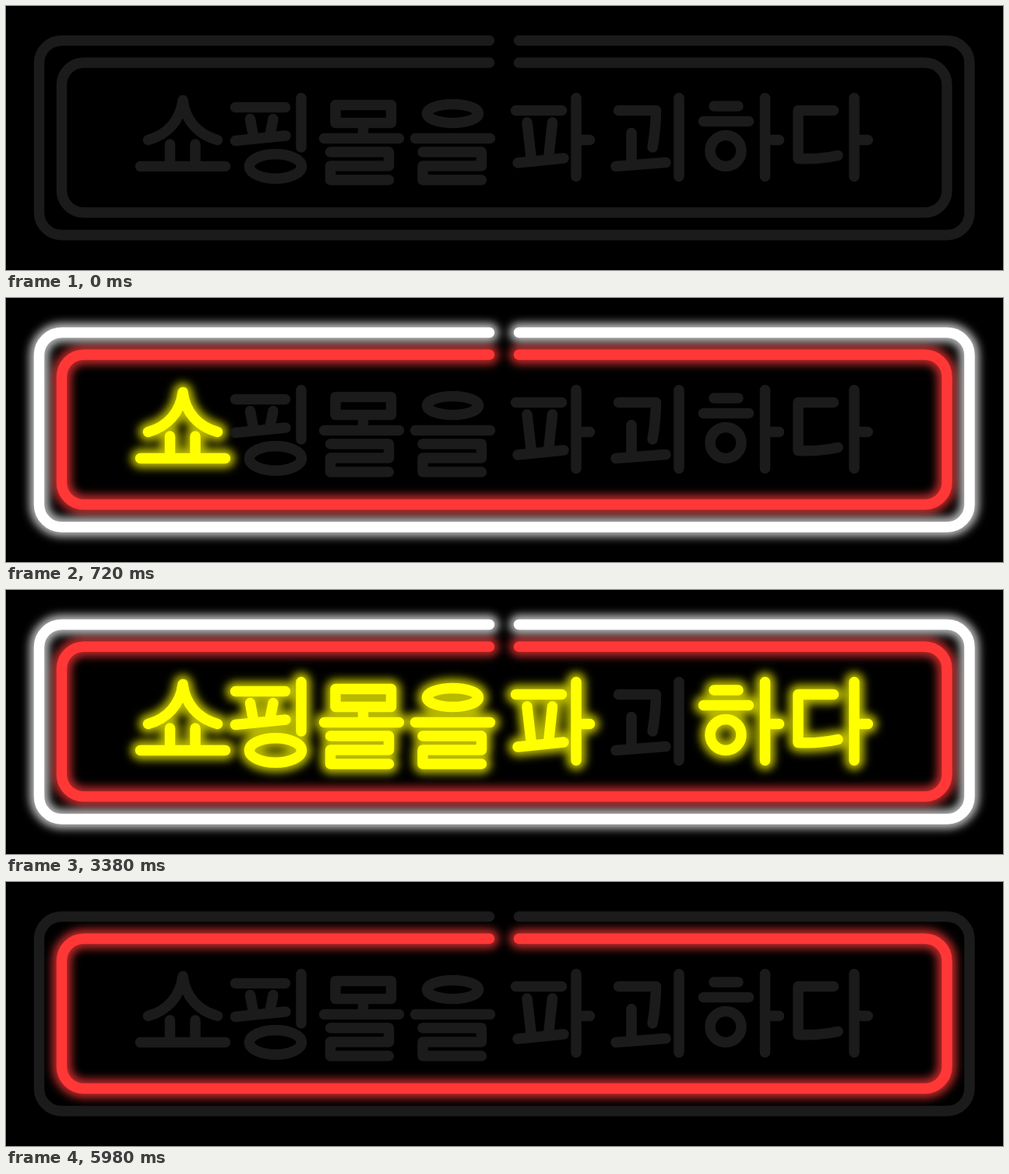
An HTML page that plays this animation: 1280 px wide and 340 px high, repeating every 6.08 s.

```html
<!DOCTYPE html>
<html lang="ko">
<head>
<meta charset="utf-8">
<title>쇼핑몰을 파괴하다</title>
<style>
  html, body { margin: 0; width: 100%; height: 100%; overflow: hidden; background: #000; }
  svg { display: block; width: 100%; height: 100%; }
  path { fill: none; stroke-width: 13.5; stroke-linecap: round; stroke-linejoin: round; }
  .glow { stroke-width: 25; opacity: .72; filter: url(#soft); mix-blend-mode: screen; }
</style>
</head>
<body>
<svg viewBox="0 0 1280 340" role="img" aria-label="쇼핑몰을 파괴하다">
  <defs>
    <filter id="soft" filterUnits="userSpaceOnUse" x="0" y="0" width="1280" height="340" color-interpolation-filters="sRGB">
      <feGaussianBlur stdDeviation="5.5"/>
    </filter>
  </defs>
  <rect width="1280" height="340"/>
  <g id="glows"></g>
  <g id="tubes"></g>
</svg>
<script>
const LOOP = 6080;
const OFF = '#1b1b1b', COOLING = '#272727';
const WHITE = '#fff', RED = '#ff3737', YELLOW = '#ff0';

// Rounded frame, open at the top centre.
function frame(l, t, r, b, c) {
  const arc = (x, y) => `A${c} ${c} 0 0 0 ${x} ${y}`;
  return `M620.5 ${t}H${l + c}${arc(l, t + c)}V${b - c}${arc(l + c, b)}` +
    `H${r - c}${arc(r, b - c)}V${t + c}${arc(r - c, t)}H658.5`;
}
const oval = (x, y, rx, ry) =>
  `M${x - rx} ${y}a${rx} ${ry} 0 1 1 ${2 * rx} 0a${rx} ${ry} 0 1 1 ${-2 * rx} 0Z`;
const rieul = (x, w) => `M${x} 188h${w}v18h${-w}v18h${w}`;
const stem = x => `M${x} 118.5V219.5`;
const tick = (x, w) => stem(x) + `M${x} 172.5h${w}`;

// Each part: path, lit colour, [on, off] spans in ms.
const parts = [
  [frame(42.5, 44.5, 1237, 295, 29), WHITE, [[620, 5980]]],
  [frame(71.5, 73, 1208, 266, 28.5), RED, [[100, 600], [620, 1260], [1280, LOOP]]],
  ['M182.5 172.5C207 166 224 147 227 121.5C230 147 247 166 271.5 172.5M210.5 178V206M243 178V206M172.5 206.5H281.5',
    YELLOW, [[660, 5880]]],
  ['M294.5 130.5H358.5M313.5 145.5L318 170M343 145.5L338.5 168M294.5 173.5L359 167M379 118.5V182' + oval(346, 206.5, 33.5, 15.8),
    YELLOW, [[760, 5780]]],
  ['M423 127.5H494.5V150.5H423ZM458.5 151V170M408.5 170.5H504.5' + rieul(416.5, 75),
    YELLOW, [[860, 5680]]],
  [oval(573.5, 138.5, 33, 12) + 'M525.5 170.5H621.5' + rieul(535, 75.5),
    YELLOW, [[960, 5680]]],
  ['M654.5 134.5H713.5M669 150L674.5 198M701.5 150L696.5 196M657 202L716 196' + tick(732, 17.5),
    YELLOW, [[1060, 5580]]],
  ['M786.5 134.5H834.5Q834 160 830 182M803 163.5V204M783 206.5L847 201.5' + stem(864),
    YELLOW, [[1260, 3380], [5380, 5580]]],
  ['M909 129H940M895.5 148.5H953.5' + oval(924, 186.5, 20, 20) + tick(974.5, 18),
    YELLOW, [[1280, 5480]]],
  ['M1062.5 134.5H1017V196.5Q1044 198 1068 192.5' + tick(1089, 17.5),
    YELLOW, [[1380, 5480]]]
].map(([d, color, spans]) => ({
  color, spans,
  glow: addPath('glows', d, color, 'glow'),
  tube: addPath('tubes', d, OFF, 'tube')
}));

function addPath(group, d, stroke, cls) {
  const path = document.createElementNS('http://www.w3.org/2000/svg', 'path');
  path.setAttribute('d', d);
  path.setAttribute('stroke', stroke);
  path.setAttribute('class', cls);
  return document.getElementById(group).appendChild(path);
}

function draw(t) {
  for (const { color, spans, glow, tube } of parts) {
    const lit = spans.some(([on, off]) => t >= on && t < off);
    const idle = color === RED && t >= 100 ? COOLING : OFF;
    glow.style.display = lit ? '' : 'none';
    tube.setAttribute('stroke', lit ? color : idle);
  }
}

const start = performance.now();
function tickFrame() {
  draw((performance.now() - start) % LOOP);
  requestAnimationFrame(tickFrame);
}
tickFrame();
</script>
</body>
</html>
```
